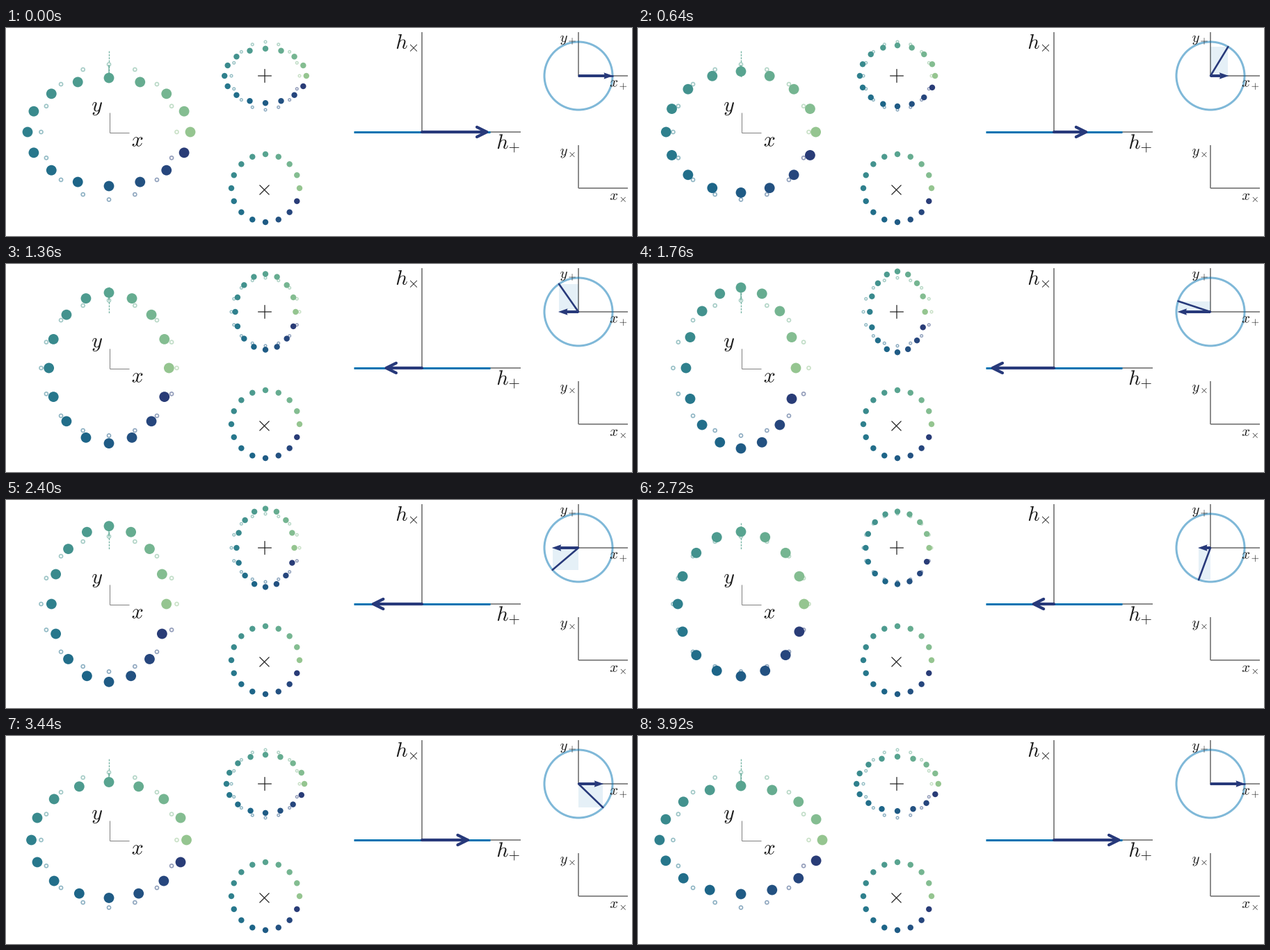
Animation of 900 by 300 pixels, one loop 4000 ms. Source, as a matplotlib script:

```python
import numpy as np
import matplotlib.pyplot as plt
from matplotlib.animation import FuncAnimation
from matplotlib.colors import LinearSegmentedColormap
from matplotlib.patches import Circle, PathPatch, Polygon, Rectangle
from matplotlib.textpath import TextPath
from matplotlib.transforms import Affine2D

W, H, DPI = 900, 300, 100
PX = 72 / DPI  # points per pixel
FRAMES, INTERVAL = 50, 80
STRAIN = 0.2
N = 16

NAVY, BLUE, GRAY, INK = "#27397a", "#0173b2", "#808080", "#1c1c1c"
crest = LinearSegmentedColormap.from_list(
    "crest_like",
    ["#a5cd90", "#7dba91", "#59a590", "#40908e",
     "#287a8c", "#1c6488", "#254b7f", "#2c3172"])
COLORS = crest(np.linspace(0, 1, N + 2)[1:-1])
THETA = 2 * np.pi * np.arange(N) / N

plt.rcParams["mathtext.fontset"] = "cm"
fig = plt.figure(figsize=(W / DPI, H / DPI), dpi=DPI, facecolor="white")
ax = fig.add_axes([0, 0, 1, 1])
ax.set_xlim(0, W)
ax.set_ylim(H, 0)
ax.axis("off")


def line(xs, ys, color, width, z, cap="butt", **kw):
    return ax.plot(xs, ys, color=color, lw=width * PX, zorder=z,
                   solid_capstyle=cap, solid_joinstyle="round", **kw)[0]


def glyph(s, cx, cy, size):
    """Draw one math symbol with its ink centred on (cx, cy)."""
    path = TextPath((0, 0), f"${s}$", size=size)
    box = path.get_extents()
    place = (Affine2D()
             .translate(-(box.x0 + box.x1) / 2, -(box.y0 + box.y1) / 2)
             .scale(1, -1).translate(cx, cy))
    ax.add_patch(PathPatch(place.transform_path(path), fc=INK, lw=0, zorder=9))


def corner(x, y, right, top, width):
    line([x, x], [top, y], GRAY, width, 1)
    line([x, right], [y, y], GRAY, width, 1)


class Ring:
    """Ring of test particles with its resting places."""

    def __init__(self, cx, cy, radius, dot, rest, edge):
        self.center, self.radius = (cx, cy), radius
        faded = COLORS.copy()
        faded[:, 3] = 0.5
        ax.scatter(*self.points(0).T, s=(rest * PX) ** 2, facecolors="white",
                   edgecolors=faded, linewidths=edge * PX, zorder=3)
        self.dots = ax.scatter(*self.points(0).T, s=(dot * PX) ** 2,
                               c=COLORS, linewidths=0, zorder=5)

    def points(self, h):
        cx, cy = self.center
        return np.column_stack([
            cx + self.radius * (1 + h) * np.cos(THETA),
            cy - self.radius * (1 - h) * np.sin(THETA)])

    def stretch(self, h):
        self.dots.set_offsets(self.points(h))


# Particle rings
CX, CY, R = 148, 150, 97.5
TOP = COLORS[N // 4]
big = Ring(CX, CY, R, 14.8, 5, 1.7)
plus = Ring(373, 69, 49, 8.4, 3.6, 1.5)
cross = Ring(373, 231, 49, 8.4, 3.6, 1.5)
line([CX, CX], [CY - R * (1 + STRAIN), CY - R * (1 - STRAIN)], TOP, 1.4, 2,
     alpha=0.8, linestyle=(0, (2, 1.1)))
shift = line([CX, CX], [CY - R, CY - R], TOP, 1.6, 4, alpha=0.7)
corner(CX + 0.5, CY + 0.5, 177, 121.5, 1)

# Polarisation plane
HX, HY, HL = 598, 150, 98
corner(HX, HY, 740, 6, 1.8)
line([HX - HL - 0.5, HX + HL], [HY, HY], BLUE, 3, 2)
shaft = line([], [], NAVY, 4.2, 4, "round")
barbs = line([], [], NAVY, 4.2, 4, "round")

# Phasor planes
PXC, PYC, PR = 823, 69, 49
corner(PXC, PYC, 894, 6, 1.8)
corner(PXC, 231, 894, 169, 1.8)
ax.add_patch(Circle((PXC, PYC), PR, fill=False, ec=BLUE, lw=3 * PX,
                    alpha=0.5, zorder=2))
area = ax.add_patch(Rectangle((PXC, PYC), 0, 0, fc=BLUE, lw=0, alpha=0.1,
                              zorder=1.5))
phasor = line([], [], NAVY, 2.6, 4, "round")
bar = line([], [], NAVY, 4, 4)
head = ax.add_patch(Polygon(np.zeros((4, 2)), fc=NAVY, lw=0, zorder=4))

# Labels
LARGE, SMALL = 30, 20.8
for s, x, y, size in [
        ("y", 131, 116.5, LARGE), ("x", 189, 164, LARGE),
        ("+", 372, 69, LARGE), (r"\times", 371.5, 233.5, LARGE),
        ("h", 714.3, 163.8, LARGE), ("+", 730.7, 172.5, 0.7 * LARGE),
        ("h", 569.3, 19.5, LARGE), (r"\times", 586, 28.7, 0.7 * LARGE),
        ("y", 802, 17.5, SMALL), ("+", 814, 19, 0.7 * SMALL),
        ("x", 874, 80, SMALL), ("+", 887.3, 84.2, 0.7 * SMALL),
        ("y", 802, 180.8, SMALL), (r"\times", 814, 182.6, 0.7 * SMALL),
        ("x", 874, 243.3, SMALL), (r"\times", 887.3, 247.3, 0.7 * SMALL)]:
    glyph(s, x, y, size)


def update(i):
    phase = 2 * np.pi * i / (FRAMES - 1)
    c, s = np.cos(phase), np.sin(phase)
    side = 1 if c >= 0 else -1

    big.stretch(STRAIN * c)
    plus.stretch(STRAIN * c)
    shift.set_ydata([CY - R, CY - R * (1 - STRAIN * c)])

    # Open arrow
    tip = HX + HL * c - 4.7 * side
    back = tip - 14.3 * side
    shaft.set_data([HX, tip], [HY, HY])
    barbs.set_data([back, tip, back], [HY - 7.1, HY, HY + 7.1])

    # Rotating phasor and its projection
    ex, ey = PXC + PR * c, PYC - PR * s
    phasor.set_data([PXC, ex], [PYC, ey])
    area.set_width(ex - PXC)
    area.set_height(ey - PYC)
    tip = ex + side
    notch, back = tip - 12 * side, tip - 13.5 * side
    bar.set_data([PXC, PXC + side * max(0, (notch - PXC) * side)], [PYC, PYC])
    head.set_xy([(tip, PYC), (back, PYC - 4.7), (notch, PYC),
                 (back, PYC + 4.7)])
    return []


anim = FuncAnimation(fig, update, frames=FRAMES, interval=INTERVAL,
                     repeat=True, blit=False)
plt.show()
```
